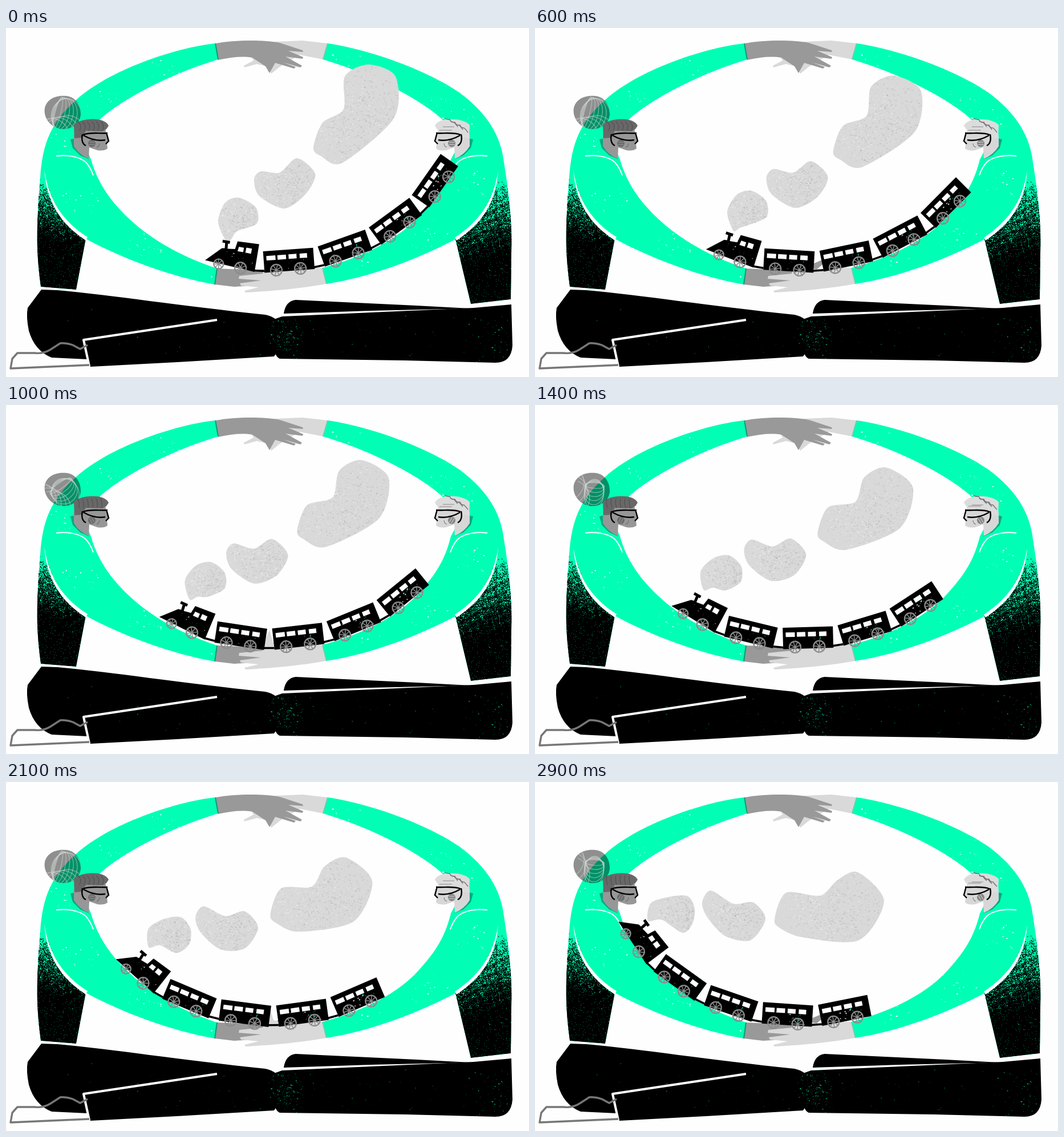
Animation of 917 by 611 pixels, one loop 3 s. Source, as an HTML page with a canvas:

```html
<!DOCTYPE html>
<html lang="en">
<head>
<meta charset="utf-8">
<title>Toy train</title>
<style>
  html, body { margin: 0; width: 100%; height: 100%; overflow: hidden; background: #fefefe; }
  canvas { display: block; }
</style>
</head>
<body>
<canvas id="stage" width="917" height="611"></canvas>
<script>
const W = 917, H = 611, FRAME = 100, COUNT = 30, MIRROR = 932;
const GREEN = '#00ffb5', WHITE = '#fefefe', BLACK = '#000';
const ctx = document.getElementById('stage').getContext('2d');

function random(seed) {
  return () => {
    seed = (seed + 0x6D2B79F5) | 0;
    let t = Math.imul(seed ^ (seed >>> 15), 1 | seed);
    t = (t + Math.imul(t ^ (t >>> 7), 61 | t)) ^ t;
    return ((t ^ (t >>> 14)) >>> 0) / 4294967296;
  };
}

function fill(g, d, color) {
  g.fillStyle = color;
  g.fill(new Path2D(d));
}

function stroke(g, d, color, width) {
  g.strokeStyle = color;
  g.lineWidth = width;
  g.stroke(new Path2D(d));
}

function within(g, path, draw) {
  g.save();
  g.clip(path);
  draw();
  g.restore();
}

function union(...shapes) {
  const path = new Path2D();
  for (const d of shapes) path.addPath(new Path2D(d));
  return path;
}

// Specks gathered towards the middle of a box
function specks(g, rnd, n, cx, cy, rx, ry, color, size) {
  g.fillStyle = color;
  for (let i = 0; i < n; i++) {
    const x = cx + (rnd() + rnd() - 1) * rx, y = cy + (rnd() + rnd() - 1) * ry;
    const s = 0.5 + rnd() ** 3 * size;
    g.fillRect(x, y, s * (0.7 + rnd()), s);
  }
}

// ---------- still scene ----------
const LEFT_BODY = 'M366 27C290 36 180 75 124 125C80 164 64 200 60 262C57 300 54 340 55 385C56 410 58 430 61 453' +
  'L123 458L140 369C200 402 290 436 366 449L370 421C300 398 240 362 200 318C170 286 156 255 149 230L136 200L160 165C185 138 265 88 372 55Z';
const RIGHT_BODY = 'M564 27C640 38 740 75 795 113C845 150 868 190 873 235C882 290 888 340 886 395L885 475L815 483' +
  'L788 370C720 405 640 436 562 448L555 420C630 400 690 368 725 328C760 290 772 262 780 230L796 200L770 165C745 138 665 88 556 55Z';
const LEFT_TRUNK = 'M68 250C78 305 100 340 140 369L123 458L61 453L50 385L58 240Z';
const RIGHT_TRUNK = 'M863 250C853 305 830 338 788 370L815 483L885 475L890 385L876 240Z';
const LEFT_LEG = 'M62 458L90 459C190 468 300 486 455 502Q478 507 482 525Q486 555 470 575L300 585L148 593L143 580L80 577' +
  'Q50 565 40 530Q35 505 38 490Z';
const RIGHT_LEG = 'M470 510L484 505L640 498L820 490L886 484L888 556Q886 586 858 586L700 582L480 579Q464 573 470 510Z';
const RIGHT_SHIN = 'M487 500Q490 478 508 476L720 486L813 491L640 495Z';

// Black grain that thickens downwards
function shadeTrunk(g, rnd, d, outer, span) {
  within(g, new Path2D(d), () => {
    g.fillStyle = BLACK;
    for (let y = 240; y < 485; y++)
      for (let x = outer - 105; x < outer + 105; x++) {
        const clump = 0.12 * Math.sin(x * 0.31 + y * 0.13) * Math.sin(y * 0.27 - x * 0.11);
        const k = (y - 262 - Math.abs(x - outer) * 0.25) / span;
        if (k > 0 && rnd() < Math.min(0.97, k + clump)) g.fillRect(x, y, 1.3, 1.3);
      }
  });
}

function buildScene() {
  const scene = document.createElement('canvas');
  scene.width = W;
  scene.height = H;
  const g = scene.getContext('2d'), rnd = random(7);
  g.fillStyle = WHITE;
  g.fillRect(0, 0, W, H);
  g.lineJoin = 'round';

  fill(g, LEFT_BODY, GREEN);
  fill(g, RIGHT_BODY, GREEN);
  within(g, union(LEFT_BODY, RIGHT_BODY), () => {
    shadeTrunk(g, rnd, LEFT_TRUNK, 55, 100);
    shadeTrunk(g, rnd, RIGHT_TRUNK, 886, 125);
    // Worn print around the sleeves
    for (let i = 0; i < 14; i++) {
      const a = i * 0.45 + rnd() * 0.3;
      specks(g, rnd, 22, 466 + 355 * Math.cos(a), 237 + 185 * Math.sin(a), 45, 35, WHITE, 1.5);
    }
  });

  fill(g, 'M67 248C76 303 99 338 143 366L140 372C95 342 72 306 67 248Z', WHITE);
  fill(g, 'M863 250C854 305 830 338 787 367L790 372C836 341 859 306 863 250Z', WHITE);

  for (const d of [LEFT_LEG, RIGHT_LEG, RIGHT_SHIN]) fill(g, d, BLACK);
  within(g, union(LEFT_LEG, RIGHT_LEG), () => {
    specks(g, rnd, 160, 492, 538, 35, 45, '#00b883', 1.1);
    specks(g, rnd, 80, 855, 545, 60, 50, '#00b883', 1.1);
    specks(g, rnd, 120, 460, 530, 430, 60, '#008a63', 1);
  });
  stroke(g, 'M370 511L136 546L146 592', WHITE, 4);
  stroke(g, 'M143 555L130 562L117 555Q104 551 95 552L78 563Q65 571 50 569L20 569L11 579L8 596L146 590', '#777', 3.4);

  const light = '#d9d9d9', dark = '#999';
  fill(g, 'M470 24L520 22L564 27L556 55L515 47L480 68L465 80L460 68L440 63L418 69L417 66L434 57L430 50Z', light);
  fill(g, 'M367 27C400 21 450 20 480 26L520 39L521 42L495 40L521 51L520 54L490 50L519 66L516 69L485 60L508 68L505 71L472 61' +
    'L462 79L455 67L432 52C415 49 395 51 372 56Z', dark);
  fill(g, 'M369 421L366 449L400 453L447 450L480 445L520 434L490 426L511 408L506 405L470 420L440 424Z', dark);
  fill(g, 'M555 420L562 448C520 455 480 460 420 463L418 460L443 454L412 451L410 447L447 442L408 439L409 434L450 430' +
    'L455 410L462 394L469 417L500 424L525 419Z', light);
  stroke(g, 'M367 27L372 55M366 449L370 421', '#0b9b72', 2);
  stroke(g, 'M564 27L556 55M562 448L555 420', '#64d3ad', 2);
  return scene;
}

// ---------- people ----------
function mirrored(draw) {
  ctx.save();
  ctx.translate(MIRROR, 0);
  ctx.scale(-1, 1);
  draw();
  ctx.restore();
}

function head(face, hair, blush, drawHair, look) {
  fill(ctx, 'M113 195L121 193L146 230L130 223L117 210Z', '#0aa77d');
  fill(ctx, 'M122 178L172 170L176 184L181 198L177 202L178 211Q172 216 160 214L146 209L145 229Q128 222 119 207L119 188Z', face);
  fill(ctx, 'M119 170C125 162 145 158 160 160C170 161 178 166 180 171L176 177L169 181L140 180L134 192L120 193Z', hair);
  drawHair();
  fill(ctx, 'M144 202A6.5 6.5 0 1 0 157 202A6.5 6.5 0 1 0 144 202Z', blush);
  ctx.save();
  ctx.translate(150.5, 202);
  ctx.rotate(look * 1.05);
  stroke(ctx, 'M-5 -2L5 -2M-5 2L5 2', face, 1);
  ctx.restore();
  stroke(ctx, 'M159 209Q164 207 164 202', blush, 1.2);
  stroke(ctx, 'M135 187C147 182 162 185 178 184M136 188C148 195 162 198 174 196M176 183L180 198L175 203', BLACK, 2.4);
  stroke(ctx, 'M134 186C132 196 134 203 140 206', BLACK, 2.4);
  stroke(ctx, 'M88 224C105 222 128 224 140 235C148 244 151 252 153 258', WHITE, 2);
}

// The yarn is rewound in three ways
function bun(look) {
  const ball = new Path2D('M68 140C72 123 90 117 106 119C124 121 132 138 131 152C129 170 113 178 98 177C79 175 65 158 68 140Z');
  ctx.save();
  ctx.globalCompositeOperation = 'multiply';
  ctx.fillStyle = '#909090';
  ctx.fill(ball);
  ctx.restore();
  within(ctx, ball, () => {
    ctx.translate(99, 148);
    ctx.rotate(0.25 + look * 0.7);
    ctx.strokeStyle = 'rgba(205,215,210,.5)';
    ctx.lineWidth = 1.4;
    for (let i = 0; i < 6; i++) {
      ctx.beginPath();
      ctx.ellipse((i - 2.5) * 3, 3 - look * 4, 5 + i * 4.2, 29 - look * 6, 0, 0, 7);
      ctx.stroke();
    }
    for (let i = -1; i < 3; i++) {
      ctx.beginPath();
      ctx.arc(i * 9, 42 - i * 4, 32, 3.4, 6);
      ctx.stroke();
    }
  });
}

function people(look) {
  bun(look);
  head('#979797', '#686868', '#6b6b6b', () => {
    for (let x = 126; x < 170; x += 8)
      stroke(ctx, `M${x} 164Q${x + 8 - look * 5} 170 ${x + 3 - look} 180`, '#505050', 1.1);
  }, look);
  mirrored(() => head('#d7d7d7', '#dcdcdc', '#858585', () => {
    for (let i = 0; i < 3; i++)
      stroke(ctx, `M${122 + i * 9} ${183 - i * 5}q4 ${look - 6} 7 -8q5 0 7 -5q${4 + look} 1 8 -2`, '#777', 1.5);
    stroke(ctx, `M146 ${173 + look}h20M150 ${179 - look}h22`, '#888', 1.2);
  }, look));
}

// ---------- smoke ----------
// Each puff melts from one outline to another, bowing off the straight way
const SMOKE = [
  { size: 110, bow: [14, 0],
    from: [539,210, 555,166, 592,142, 594,85, 635,64, 683,85, 680,158, 590,236, 552,224],
    to: [420,240, 440,194, 500,199, 530,172, 566,158, 612,208, 568,277, 470,272, 430,256] },
  { size: 65, bow: [0, 14],
    from: [435,265, 447,251, 480,253, 510,228, 542,255, 526,290, 488,316, 444,294],
    to: [293,212, 308,190, 348,213, 383,211, 404,240, 378,277, 334,270, 303,238] },
  { size: 45, bow: [0, 13],
    from: [387,374, 372,340, 384,306, 408,297, 438,314, 440,342, 405,356, 396,368],
    to: [198,243, 203,212, 236,201, 268,200, 280,222, 276,248, 259,264, 222,241] }];

function outline(p) {
  const n = p.length / 2, path = new Path2D(), ease = 7;
  const at = i => [p[((i + n) % n) * 2], p[((i + n) % n) * 2 + 1]];
  path.moveTo(p[0], p[1]);
  for (let i = 0; i < n; i++) {
    const [a, b, c, d] = [at(i - 1), at(i), at(i + 1), at(i + 2)];
    path.bezierCurveTo(b[0] + (c[0] - a[0]) / ease, b[1] + (c[1] - a[1]) / ease,
      c[0] - (d[0] - b[0]) / ease, c[1] - (d[1] - b[1]) / ease, c[0], c[1]);
  }
  path.closePath();
  return path;
}

function puff({ size, bow, from, to }, f) {
  const u = f / (COUNT - 1), rnd = random(f % 3 + size);
  const p = from.map((v, i) => v + (to[i] - v) * u + bow[i % 2] * Math.sin(Math.PI * u));
  const mean = axis => p.filter((v, i) => i % 2 === axis).reduce((a, b) => a + b) * 2 / p.length;
  const x = mean(0), y = mean(1), path = outline(p);
  ctx.fillStyle = '#d9d9d9';
  ctx.fill(path);
  within(ctx, path, () => {
    specks(ctx, rnd, size * 14, x + size * 0.3, y + size * 0.1, size, size, 'rgba(140,140,140,.22)', 1.8);
    specks(ctx, rnd, size * 9, x - size * 0.2, y - size * 0.1, size, size, 'rgba(245,245,245,.4)', 1.8);
  });
}

// ---------- train ----------
const TRACK = { x: 466, y: 119, a: 350, b: 305, start: 2.64 };
const LENGTH = 266;

// Walk along the elliptic track in short steps
function onTrack(dist) {
  const { x, y, a, b, start } = TRACK;
  let t = start;
  for (let left = dist; left > 0; left--)
    t -= Math.min(1, left) / Math.hypot(a * Math.sin(t), b * Math.cos(t));
  return [x + a * Math.cos(t), y + b * Math.sin(t)];
}

const travel = f => 8.8 * f + 11 * (f / (COUNT - 1)) ** 8;

function axles(i) {
  const front = i ? 102 + (i - 1) * 105.3 : 0;
  return [front, front + (i ? 42.4 : 39)];
}

function wheel([x, y], r, turn) {
  ctx.strokeStyle = '#8c8c8c';
  ctx.lineWidth = 2.2;
  ctx.beginPath();
  ctx.arc(x, y, r - 1, 0, 7);
  ctx.stroke();
  ctx.lineWidth = 1.5;
  ctx.beginPath();
  for (let i = 0; i < 4; i++) {
    const a = turn + i * Math.PI / 4, dx = Math.cos(a) * r, dy = Math.sin(a) * r;
    ctx.moveTo(x - dx, y - dy);
    ctx.lineTo(x + dx, y + dy);
  }
  ctx.stroke();
}

function body(isEngine, seed) {
  if (isEngine) {
    fill(ctx, 'M-44 -2L-19 -28L-14 -29L-15 -38L-20 -38L-20 -43L-7 -43L-7 -38L-10 -38L-9 -29L4 -31L6 -45L44 -47L45 2Z', BLACK);
    fill(ctx, 'M10 -36h9v8h-10ZM23 -37h10v9h-10Z', WHITE);
  } else {
    fill(ctx, 'M-42 -34.5L46 -34.5L46 3L-42 3Z', BLACK);
    ctx.fillStyle = WHITE;
    for (let i = 0; i < 4; i++) ctx.fillRect(-37 + i * 19.5, -26, 16 - i, 8);
  }
  const rnd = random(seed);
  specks(ctx, rnd, 12, 8, -14, 34, 17, '#d5d5d5', 1.4);
  specks(ctx, rnd, 8, 20, -12, 20, 16, '#00c98f', 1.4);
}

function train(f) {
  const s = travel(f), turn = -s / 10.5;
  let hitch;
  for (let i = 0; i < 5; i++) {
    const [a, b] = axles(i).map(d => onTrack(LENGTH - s + d));
    const angle = Math.atan2(b[1] - a[1], b[0] - a[0]), mid = [(a[0] + b[0]) / 2, (a[1] + b[1]) / 2];
    const end = x => `${mid[0] + Math.cos(angle) * x} ${mid[1] + Math.sin(angle) * x}`;
    if (i) stroke(ctx, `M${hitch}L${end(-42)}`, BLACK, 3.5);
    hitch = end(43);
    ctx.save();
    ctx.translate(...mid);
    ctx.rotate(angle);
    body(i === 0, i + 20);
    ctx.restore();
    wheel(a, i ? 11 : 9.5, turn + i);
    wheel(b, 11, turn + i + 0.4);
  }
}

// ---------- loop ----------
const scene = buildScene(), start = performance.now();
let shown = -1;

function tick() {
  const f = Math.floor((performance.now() - start) / FRAME) % COUNT;
  if (f !== shown) {
    shown = f;
    ctx.drawImage(scene, 0, 0);
    people(f % 3);
    for (const cloud of SMOKE) puff(cloud, f);
    train(f);
  }
  requestAnimationFrame(tick);
}
tick();
</script>
</body>
</html>
```
